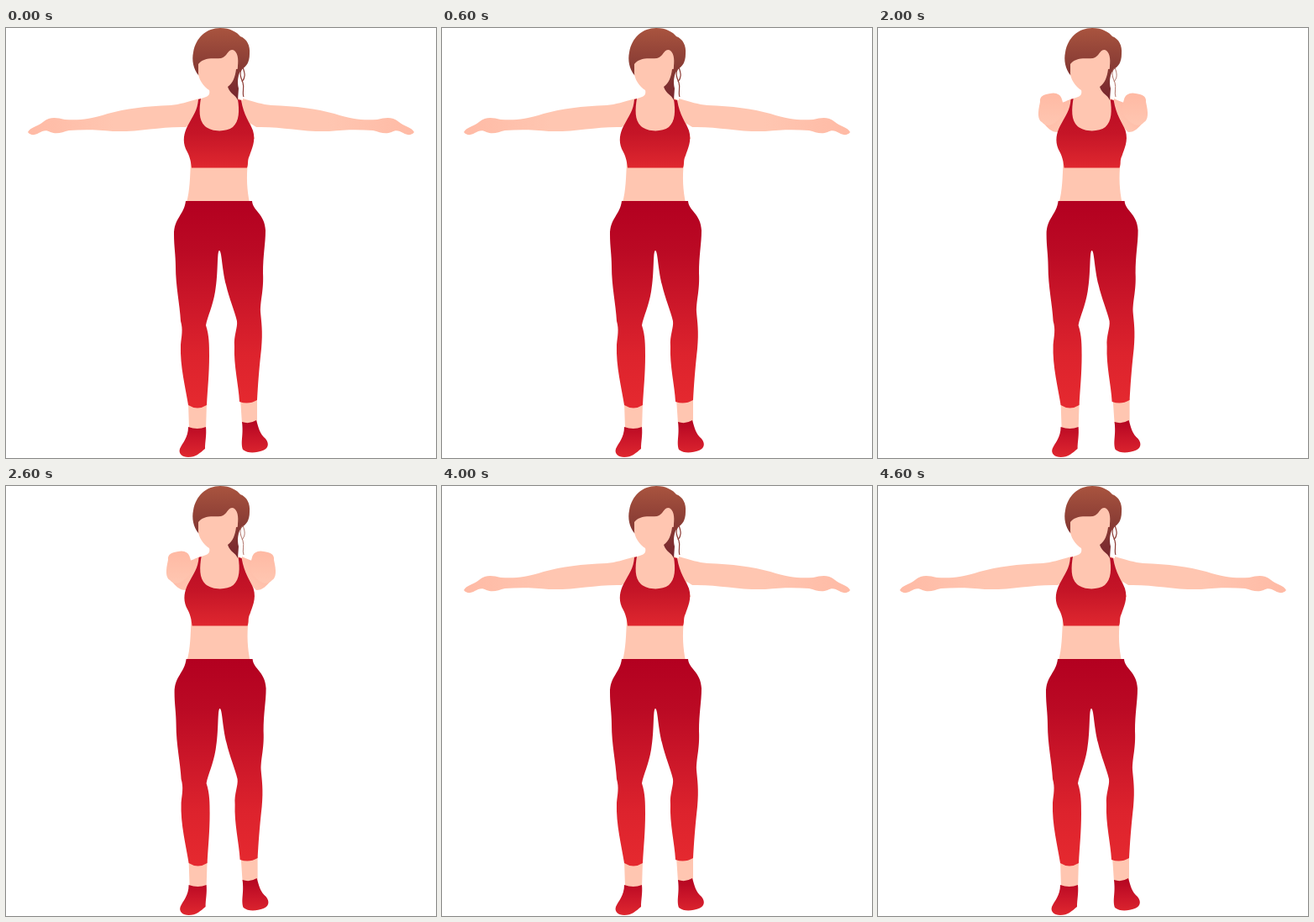
An HTML page with a canvas for the animation above (5000 ms loop, 512 by 512 pixels).

```html
<!DOCTYPE html>
<html lang="en">
<head>
<meta charset="utf-8">
<title>Arm exercise</title>
<style>
  html, body { margin: 0; width: 100%; height: 100%; overflow: hidden; background: #fff; }
  canvas { display: block; width: 100vmin; height: 100vmin; }
</style>
</head>
<body>
<canvas id="stage" width="512" height="512"></canvas>
<script>
const ctx = document.getElementById('stage').getContext('2d');
const SKIN = '#ffc6b1';
const STEP = 1000;
const ORDER = ['wide', 'half', 'front', 'half', 'wide'];

function gradient(x0, y0, x1, y1, ...colors) {
  const g = ctx.createLinearGradient(x0, y0, x1, y1);
  colors.forEach((c, i) => g.addColorStop(i / (colors.length - 1), c));
  return g;
}
const down = (y0, y1, ...colors) => gradient(0, y0, 0, y1, ...colors);

const hairFill = down(0, 86, '#a9543f', '#8a3d35', '#76252d');
const braFill = down(84, 166, '#b80a24', '#c51527', '#df272f');
const pantsFill = down(206, 450, '#b30020', '#bb0a24', '#cc1729', '#dd232d', '#e5292f');
const sockFill = down(470, 511, '#b60722', '#cc172a', '#df272f');

const shapes = {
  hair: 'M229 56C223 49 221 38 223 29C226 11 239 0 255 0C267 0 275 5 279 10C287 13 291 21 290 31C290 41 286 46 281 49L274 58L240 60Z',
  head: 'M229 54L229 43C236 34 248 37 256 36C264 34 263 26 270 26C276 28 277 37 276 45C276 56 272 64 267 69L277 84L284 87L296 132L213 132L224 87C236 82 244 83 242 74C235 70 229 60 229 54Z',
  ponytail: 'M264 70C270 66 273 58 274 49L281 48C276 55 275 64 277 72L276 86C273 79 267 79 264 70Z',
  waist: 'M220 160H288C286 178 287 193 290 208H215C219 193 219 178 220 160Z',
  bra: 'M229 85L232 84C230 96 229 110 237 117C245 124 262 124 270 118C278 111 278 98 276 85L280 86C283 104 290 112 294 122C298 135 292 145 290 152C287 158 289 161 287 166.5H221C220 158 219 153 214 144C210 134 212 125 216 117C223 104 228 98 229 85Z',
  pants: 'M214 206H293C294 218 308 221 309 241C309 257 306 270 306 292C307 313 303 322 303 338C304 350 306 361 304 382C301 409 300 426 299 443Q289 449 278 445C277 425 271 402 272 379C271 366 276 357 275 349C272 336 266 323 262 306C257 287 257 265 254 265C251 265 253 292 249 314C246 332 240 343 238 354C242 366 242 378 242 390C242 412 240 430 239 449Q228 456 217 449C214 429 207 403 208 377C209 367 211 359 208 349C207 329 202 308 202 284C202 270 200 260 200 246C200 226 212 223 214 206Z',
  ankles: 'M217 446L239 446L238 478Q227 482 218 477ZM279 441L299 441L299 470Q289 475 281 471Z',
  leftSock: 'M217 475Q228 479 238 475C239 485 237 492 237 501C231 506 226 511 217 511C210 511 205 507 207 501C210 494 217 488 217 475Z',
  rightSock: 'M281 469Q290 472 298 467C301 477 302 483 309 489C314 495 312 501 306 503C298 506 288 507 282 502C279 492 283 486 281 469Z',
  strand: 'M281 48C277 54 280 60 282 65C284 71 281 77 283 82',
  curl: 'M282 47C285 55 285 59 281 64'
};
const paths = {};
for (const name in shapes) paths[name] = new Path2D(shapes[name]);

// Left arms; the right side is mirrored about the centre.
const arms = {
  wide: [
    [new Path2D('M230 84C216 88 207 91 196 92C166 93 143 96 121 102C99 109 87 110 70 109C60 107 53 105 44 112C38 117 29 118 26 124C29 128 34 128 39 125C44 122 48 121 53 124C61 127 67 124 75 122C92 121 108 121 127 123C159 124 184 117 214 118L230 108Z'),
      gradient(26, 0, 230, 0, '#ffbaa5', SKIN, SKIN)]
  ],
  half: [
    [new Path2D('M231 83C216 88 199 88 176 90L174 107C188 108 200 114 216 118L231 106Z'),
      gradient(180, 106, 222, 92, '#ffb09c', '#ffb5a1', SKIN)],
    [new Path2D('M152 82C155 75 162 75 168 73C174 73 179 77 180 84C183 91 183 99 178 104C173 108 167 107 162 108C155 108 150 107 150 101Z'),
      down(74, 109, '#ffb9a3', SKIN)]
  ],
  front: [
    [new Path2D('M231 84C221 89 212 90 208 96L197 113C202 119 206 124 214 124L231 108Z'),
      gradient(200, 94, 222, 115, '#ffb49f', SKIN)],
    [new Path2D('M193 88C192 81 198 79 205 78C211 76 218 79 219 85C222 94 222 104 216 108C210 114 202 120 195 112C190 109 190 101 193 88Z'),
      down(77, 115, '#ffb9a3', SKIN)]
  ]
};

function fill(path, color) {
  ctx.fillStyle = color;
  ctx.fill(path);
}

function drawArms(pose) {
  for (const side of [1, -1]) {
    ctx.save();
    if (side < 0) {
      ctx.translate(512, 0);
      ctx.scale(-1, 1);
    }
    for (const [path, color] of arms[pose]) fill(path, color);
    ctx.restore();
  }
}

function drawHead(pose) {
  fill(paths.hair, hairFill);
  fill(paths.head, SKIN);
  fill(paths.ponytail, hairFill);
  ctx.strokeStyle = pose === 'wide' ? '#8c3b35' : '#a9665b';
  ctx.lineWidth = pose === 'wide' ? 1.2 : 0.9;
  ctx.stroke(paths.strand);
  ctx.stroke(paths.curl);
}

function draw(pose) {
  ctx.fillStyle = '#fff';
  ctx.fillRect(0, 0, 512, 512);
  drawHead(pose);
  drawArms(pose);
  ctx.save();
  if (pose !== 'wide') ctx.translate(0.6, 0);
  fill(paths.waist, SKIN);
  fill(paths.bra, braFill);
  fill(paths.ankles, SKIN);
  fill(paths.pants, pantsFill);
  fill(paths.leftSock, sockFill);
  fill(paths.rightSock, sockFill);
  ctx.restore();
}

const start = performance.now();
function tick() {
  const time = Math.max(0, performance.now() - start);
  draw(ORDER[Math.floor(time / STEP) % ORDER.length]);
  requestAnimationFrame(tick);
}
tick();
</script>
</body>
</html>
```
